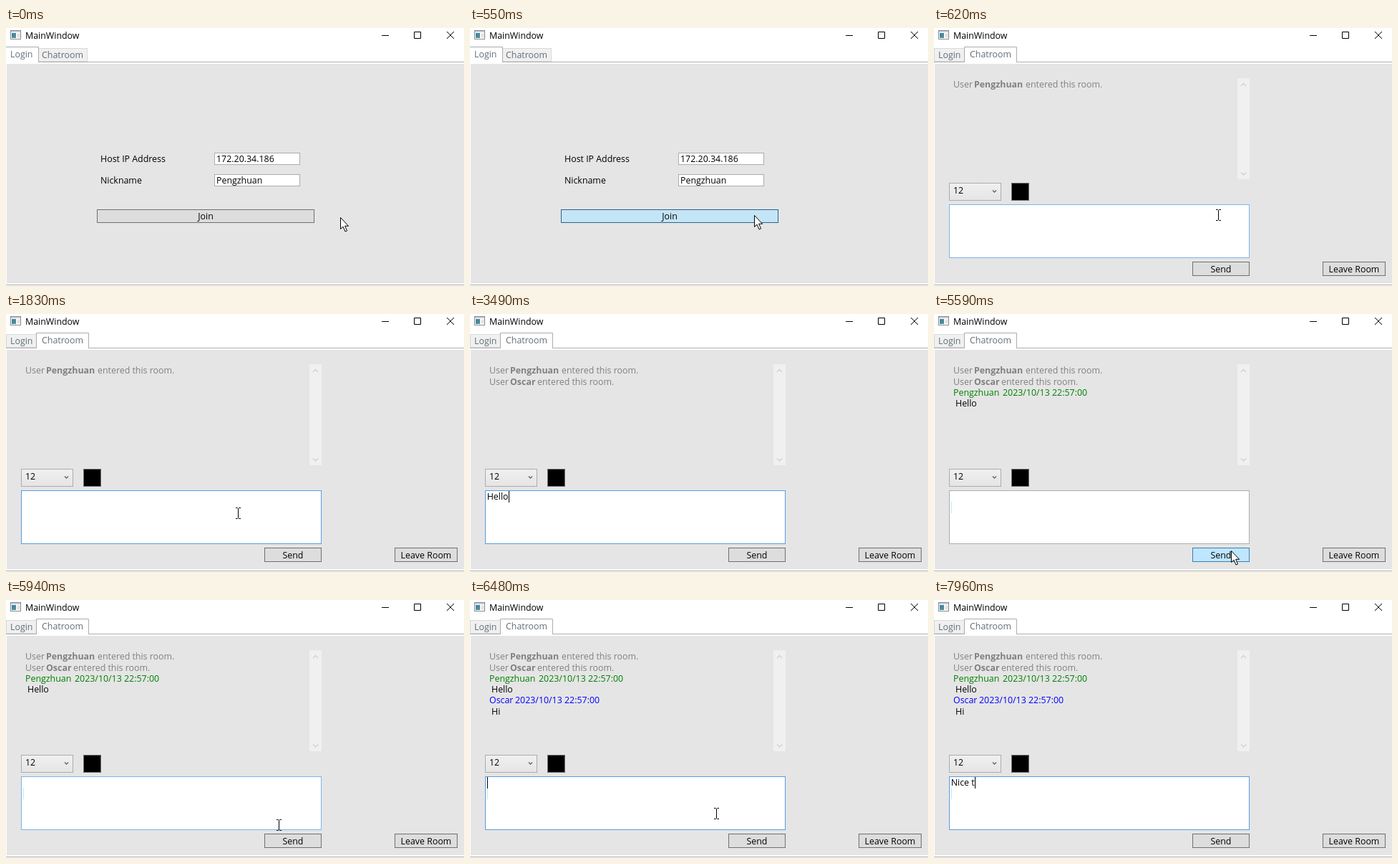
An HTML page that plays this animation: 640 by 360 pixels, repeating every 8000 ms.

```html
<!DOCTYPE html>
<html lang="en">
<head>
<meta charset="utf-8">
<title>MainWindow</title>
<style>
  html, body { margin: 0; width: 100%; height: 100%; overflow: hidden; background: #fff; }
  svg { display: block; width: 640px; height: 360px; }
  text { font: 12.4px "Open Sans", "Noto Sans", sans-serif; white-space: pre; }
  .tab { fill: #5f7076; }
  .front { fill: #fff; stroke: #acacac; }
  .back { fill: #f0f0f0; stroke: #d9d9d9; }
  .field { fill: #fff; stroke: #abadb3; }
  .field.hover { stroke: #7eb4ea; }
  .field.focus { stroke: #569de5; }
  .button { fill: #ddd; stroke: #707070; }
  .button.hover { fill: #bee6fd; stroke: #3c7fb1; }
  .button.press { fill: #c4e5f6; stroke: #2c628b; }
  .mid { text-anchor: middle; }
  .note { fill: #808080; }
  .who { font-weight: 700; }
  .mine { fill: #008000; }
  .other { fill: #00f; }
  .line { fill: none; stroke: #000; }
</style>
</head>
<body>
<svg viewBox="0 0 640 360">
  <defs>
    <linearGradient id="combo" x2="0" y2="1">
      <stop stop-color="#f0f0f0"/><stop offset="1" stop-color="#e5e5e5"/>
    </linearGradient>
    <linearGradient id="pane" x2="1" y2="1">
      <stop stop-color="#3f77b8"/><stop offset="1" stop-color="#4f9d8c"/>
    </linearGradient>
  </defs>
  <rect width="640" height="360" fill="#fff"/>

  <!-- title bar -->
  <rect x="6.5" y="3.5" width="14" height="12" fill="#fff" stroke="#85898f"/>
  <rect x="7" y="4" width="13" height="2" fill="#c9ced4"/>
  <rect x="8" y="7" width="6" height="7" fill="url(#pane)"/>
  <path d="M15.5 8.5h4M15.5 10.5h4M15.5 12.5h4" stroke="#c4c8cc"/>
  <text x="27" y="15">MainWindow</text>
  <path class="line" d="M525 10.5h10M570.5 5.5h9v9h-9zM616 5l10 10M626 5l-10 10"/>

  <!-- tab frame -->
  <path d="M0 47.5h640M0 358.5h640" stroke="#acacac"/>
  <rect x="1" y="50" width="639" height="306" fill="#e5e5e5"/>

  <g id="login">
    <rect class="back" x="45.5" y="28.5" width="68" height="18"/>
    <path class="front" d="M-.5 47.5v-21h46v21"/>
    <rect y="47" width="45" height="2" fill="#fff"/>
    <text class="tab" x="6" y="41">Login</text>
    <text class="tab" x="50" y="42">Chatroom</text>

    <text x="132" y="187">Host IP Address</text>
    <text x="132" y="217">Nickname</text>
    <rect class="field" x="291.5" y="174.5" width="119" height="16"/>
    <rect class="field" x="291.5" y="204.5" width="119" height="16"/>
    <text x="294" y="187">172.20.34.186</text>
    <text x="294" y="217">Pengzhuan</text>
    <rect id="join" class="button" x="127.5" y="253.5" width="303" height="18"/>
    <text class="mid" x="279" y="267">Join</text>
  </g>

  <g id="chat">
    <rect class="back" x=".5" y="28.5" width="42" height="18"/>
    <path class="front" d="M42.5 47.5v-21h73v21"/>
    <rect x="43" y="47" width="72" height="2" fill="#fff"/>
    <text class="tab" x="6" y="42">Login</text>
    <text class="tab" x="50" y="41">Chatroom</text>

    <rect x="424" y="70" width="17" height="141" fill="#f0f0f0"/>
    <path d="M429 81l3.5-3.5 3.5 3.5M429 201.5l3.5 3.5 3.5-3.5" fill="none" stroke="#d0d0d0" stroke-width="1.4"/>

    <g class="note">
      <text x="27" y="83">User</text><text class="who" x="56" y="83">Pengzhuan</text>
      <text x="128" y="83">entered this room.</text>
    </g>
    <g class="note" id="guest">
      <text x="27" y="99">User</text><text class="who" x="56" y="99">Oscar</text>
      <text x="94" y="99">entered this room.</text>
    </g>
    <g id="hello">
      <text class="mine" x="27" y="114">Pengzhuan</text>
      <text class="mine" x="96" y="114">2023/10/13 22:57:00</text>
      <text x="30" y="129">Hello</text>
    </g>
    <g id="reply">
      <text class="other" x="27" y="144">Oscar</text>
      <text class="other" x="63" y="144">2023/10/13 22:57:00</text>
      <text x="30" y="160">Hi</text>
    </g>

    <rect x="21.5" y="216.5" width="72" height="24" fill="url(#combo)" stroke="#acacac"/>
    <text x="27" y="231">12</text>
    <path d="M82 226.5l2.5 2.5 2.5-2.5" fill="none" stroke="#606060" stroke-width="1.3"/>
    <rect x="108.5" y="216.5" width="24" height="24" stroke="#707070"/>

    <rect id="box" class="field" x="21.5" y="246.5" width="419" height="74"/>
    <rect id="trace" x="24" y="262" width="1" height="16" fill="#c3ebfa"/>
    <text id="draft" x="23.7" y="259"></text>
    <rect id="caret" width="1" height="16"/>

    <rect id="send" class="button" x="361.5" y="326.5" width="79" height="19"/>
    <text class="mid" x="401" y="341">Send</text>
    <rect class="button" x="543.5" y="326.5" width="87" height="19"/>
    <text class="mid" x="587" y="341">Leave Room</text>
  </g>

  <g id="pointer">
    <path id="arrow" d="M.5 .5v16l3.5-3.3 3 6.8 2.6-1.1-3-6.6h5z" fill="#fff" stroke="#000"/>
    <path id="beam" class="line" d="M-3 -7.5h2.5l1 1 1-1h2.5M.5 -6.5v13M-3 7.5h2.5l1-1 1 1h2.5"/>
  </g>
</svg>
<script>
  const LOOP = 8000, FRAME = 76, BLINK = 530;
  const JOINED = 620, GUEST = 2100, SENT = 5514, REPLY = 5970;
  const $ = id => document.getElementById(id);
  const out = p => 1 - (1 - p) ** 2;
  const inOut = p => p * p * (3 - 2 * p);
  const within = (t, from, to) => t >= from && t < to;

  const moves = [
    { start: 70, end: 470, from: [467, 264], to: [397, 261], ease: out },
    { start: 880, end: 1300, from: [397, 261], to: [324, 278], ease: inOut },
    { start: 4830, end: 5400, from: [518, 365], to: [415, 330], ease: out },
    { start: 5660, end: 6280, from: [415, 330], to: [344, 298], ease: inOut },
    { start: 6490, end: 6830, from: [344, 298], to: [201, 289], ease: inOut }
  ];

  // each spell of focus in the message box, with its keystrokes
  const spells = [
    { focus: 1300, blur: 5430, text: "Hello\n", keys: [2430, 2890, 3150, 3280, 3490, 4090] },
    { focus: 6300, blur: LOOP, text: "Nice t", keys: [7230, 7430, 7570, 7700, 7830, 7960] }
  ];

  function show(id, on) {
    $(id).style.display = on ? "" : "none";
  }

  function place(el, x, y) {
    el.setAttribute("x", x);
    el.setAttribute("y", y);
  }

  function pointerAt(t) {
    const m = moves.filter(m => m.start <= t).pop();
    if (!m) return moves[0].from;
    const step = Math.floor((t - m.start) / FRAME) + 1;
    const p = m.ease(Math.min(1, step * FRAME / (m.end - m.start)));
    return m.from.map((v, i) => Math.round(v + (m.to[i] - v) * p));
  }

  function over([x, y], id) {
    const r = $(id).getBBox();
    return within(x, r.x, r.x + r.width) && within(y, r.y, r.y + r.height);
  }

  function setState(id, base, strong, hover) {
    const [kind, on] = strong;
    $(id).setAttribute("class", `${base} ${on ? kind : hover ? "hover" : ""}`);
  }

  function drawText(t) {
    const spell = spells.filter(s => s.focus <= t).pop() || spells[0];
    const pressed = spell.keys.filter(k => k <= t);
    const lines = spell.text.slice(0, pressed.length).split("\n");
    const focused = within(t, spell.focus, spell.blur);
    const kept = focused || t < SENT;
    $("draft").textContent = kept ? lines[0] : "";

    const since = t - (pressed.pop() || spell.focus);
    const row = lines.length - 1;
    const width = row ? 0 : $("draft").getComputedTextLength();
    show("caret", focused && Math.floor(since / BLINK) % 2 === 0);
    place($("caret"), 24 + Math.round(width), 247 + 15 * row);
    return focused;
  }

  function draw(t) {
    const chat = t >= JOINED;
    show("login", !chat);
    show("chat", chat);
    show("guest", t >= GUEST);
    show("hello", t >= SENT);
    show("trace", t >= SENT);
    show("reply", t >= REPLY);
    const focused = drawText(t);

    const at = pointerAt(t);
    const overBox = chat && over(at, "box");
    const visible = t < spells[0].keys[0] || within(t, moves[2].start, spells[1].keys[0]);
    setState("join", "button", ["press", within(t, 520, JOINED)], !chat && over(at, "join"));
    setState("send", "button", ["press", within(t, 5430, SENT)], visible && chat && over(at, "send"));
    setState("box", "field", ["focus", focused], visible && overBox);
    show("pointer", visible);
    show("arrow", !overBox);
    show("beam", overBox);
    $("pointer").setAttribute("transform", `translate(${at})`);
  }

  function tick() {
    draw(performance.now() % LOOP);
    requestAnimationFrame(tick);
  }
  tick();
</script>
</body>
</html>
```
